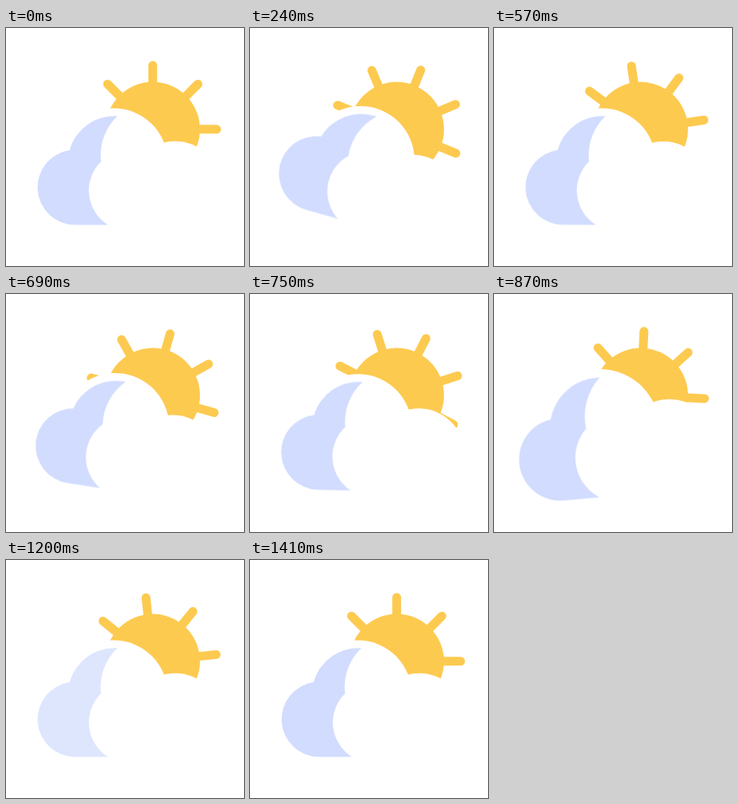
Animation, 298 px wide and 298 px high, one loop 1.5 s. Source, as an HTML page without scripts:

```html
<!DOCTYPE html>
<html lang="en">
<head>
<meta charset="utf-8">
<title>Sun and cloud</title>
<style>
  html, body { margin: 0; width: 100%; height: 100%; overflow: hidden; background: #fff; }
  svg { display: block; width: 100vw; height: 100vh; }

  .sun { fill: #fdca50; stroke: #fdca50; animation: spin 1.5s infinite; }
  .rays { stroke-width: 11; stroke-linecap: round; }

  .cloud {
    transform-origin: 146.5px 179px;
    animation: swing 1.5s ease-in-out infinite, pulse 1.5s ease-in-out infinite;
  }
  .body { fill: #fff; }
  .shade { fill: #d1dcfe; animation: fade 1.5s ease-in-out infinite; }

  @keyframes spin {
    0% { rotate: 0deg; animation-timing-function: cubic-bezier(.35, .12, .55, 1); }
    94%, 100% { rotate: 180deg; }
  }
  @keyframes swing {
    0% { rotate: 0deg; }
    15% { rotate: 16deg; }
    31% { rotate: -9deg; }
    45% { rotate: 9deg; }
    55% { rotate: -6deg; }
    66%, 100% { rotate: 0deg; }
  }
  @keyframes pulse {
    0%, 50% { scale: 1; }
    57% { scale: 1.1; }
    66%, 100% { scale: 1; }
  }
  @keyframes fade {
    0%, 64% { opacity: 1; }
    76% { opacity: .65; }
    90%, 100% { opacity: 1; }
  }
</style>
</head>
<body>
<svg viewBox="0 0 298 298">
  <g transform="translate(183.7 126.8)">
    <g class="sun">
      <circle r="59.2" stroke="none"/>
      <path class="rays" d="M-80 0H80M0-80V80M-56.6-56.6L56.6 56.6M-56.6 56.6L56.6-56.6"/>
    </g>
  </g>
  <g class="cloud">
    <g class="body">
      <circle cx="86.5" cy="199" r="56.5"/>
      <circle cx="135" cy="168" r="67.5"/>
      <circle cx="212" cy="198.5" r="56.7"/>
      <path d="M86 168H212V255.5H86Z"/>
    </g>
    <path class="shade" d="M86.5 246.5A47 47 0 0 1 79.7 153A58 58 0 0 1 139.5 110.3A67 67 0 0 0 119 167A51 51 0 0 0 127.5 246.5Z"/>
  </g>
</svg>
</body>
</html>
```
